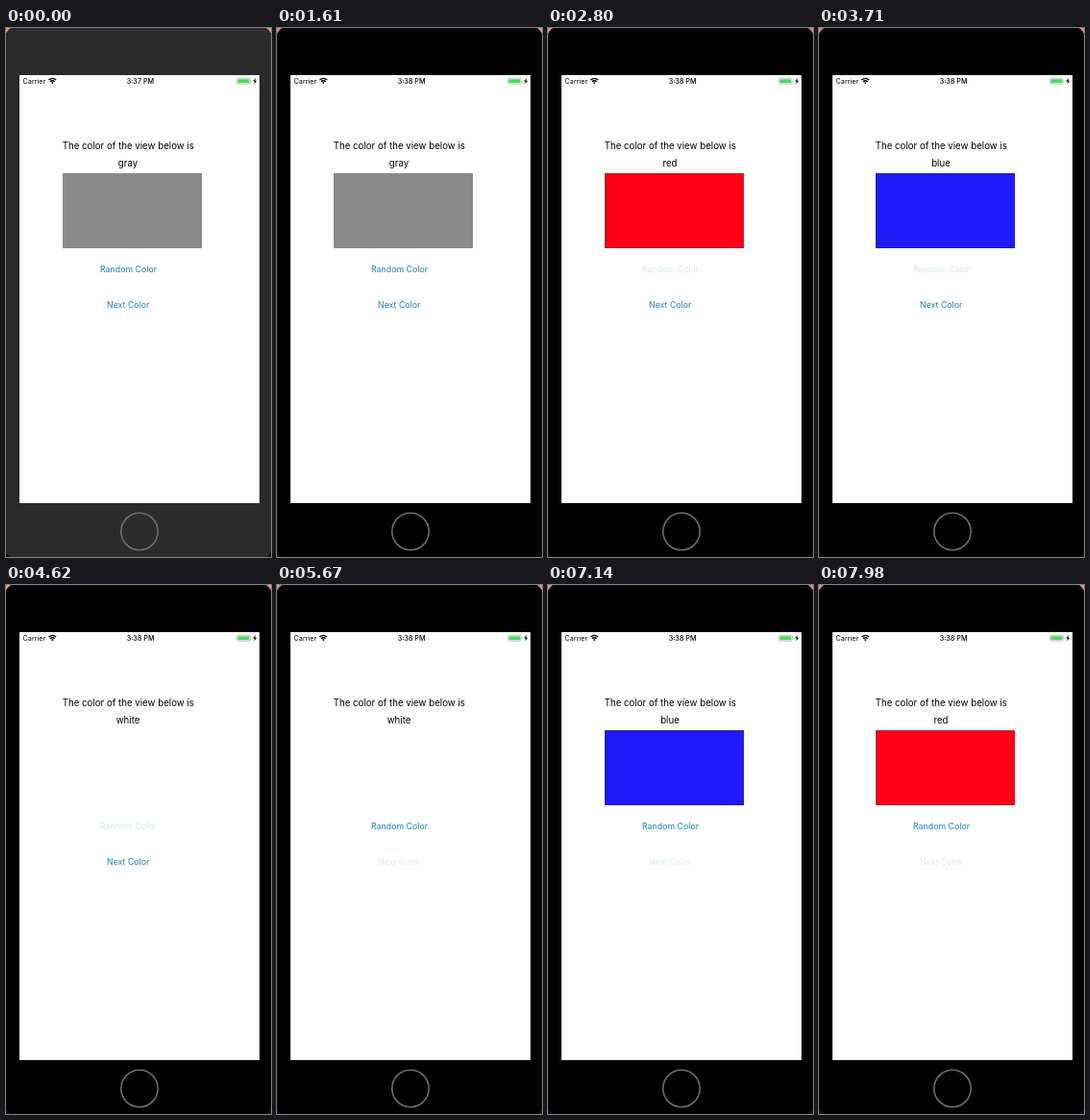
Animation of 276x550 px, one loop 8 s. Source, as an HTML page:

```html
<!DOCTYPE html>
<html lang="en">
<head>
<meta charset="utf-8">
<title>Color view</title>
<style>
  html, body { margin: 0; width: 100%; height: 100%; overflow: hidden; background: #000; }
  svg { display: block; width: 100%; height: 100%; }
  text { font-family: Inter, Roboto, sans-serif; }
  .status { font-size: 7.2px; }
  .label { font-size: 9.7px; text-anchor: middle; }
  .button { font-size: 8.8px; text-anchor: middle; fill: #1a84b0; }
  #bezel { fill: #2b2b2b; animation: focus 8s step-end infinite; }
  @keyframes focus { 20.125% { fill: #000; } }
</style>
</head>
<body>
<svg viewBox="0 0 276 550">
  <rect id="bezel" width="276" height="550"/>
  <g fill="#d99087" stroke="#1a1010" stroke-width="1">
    <path d="M-1-1H7Q2 2-1 8Z"/>
    <path d="M277-1H269Q274 2 277 8Z"/>
  </g>
  <path d="M0 545Q2 548 5 550H0ZM276 545Q274 548 271 550H276Z" fill="#1c0d0d"/>
  <circle cx="139" cy="523.5" r="19.2" fill="none" stroke="#6c6c6c" stroke-width="1.6"/>
  <rect x="14" y="49" width="250" height="445" fill="#fff"/>

  <text class="status" x="17.6" y="58">Carrier</text>
  <g fill="none" stroke="#000" stroke-width="1.3">
    <path d="M44.4 54.1Q48.3 50.6 52.2 54.1"/>
    <path d="M45.9 55.8Q48.3 53.7 50.7 55.8"/>
  </g>
  <path d="M48.3 58.2L46.9 56.8Q48.3 55.7 49.7 56.8Z"/>
  <text class="status" id="clock" x="125.7" y="58" font-weight="500"></text>
  <rect x="240.4" y="52.2" width="14" height="6" rx="1.4" fill="none" stroke="#a5b5aa" stroke-width=".7"/>
  <rect x="241.4" y="53.2" width="12" height="4" rx=".6" fill="#4cd964"/>
  <path d="M255.1 54.2q1 1 0 2Z" fill="#a5b5aa"/>
  <path d="M260 51.8L257.2 55.6H259L258.3 58.6L261.2 54.7H259.3Z"/>

  <text class="label" x="127.3" y="126">The color of the view below is</text>
  <text class="label" id="name" x="127" y="143.7"></text>
  <rect id="view" x="59" y="151" width="145" height="78"/>
  <rect id="edge" x="59.25" y="151.25" width="144.5" height="77.5" fill="none" stroke-width=".5"/>
  <text class="button" id="random" x="127.5" y="253.8">Random Color</text>
  <text class="button" id="next" x="127.2" y="290.6">Next Color</text>
</svg>
<script>
  const LOOP = 8000, FADE = 420, DIM = 0.16;
  const colors = {
    gray: '#8a8a8a', brown: '#a57144', red: '#ff0018',
    blue: '#1f1af7', green: '#21f906', white: '#fff'
  };
  const edges = { red: '#70304a', blue: '#20205a' };
  const shown = [
    [0, 'gray'], [1820, 'brown'], [2800, 'red'], [3710, 'blue'], [4620, 'white'],
    [6580, 'blue'], [7350, 'green'], [7980, 'red']
  ];
  // Each press is [touch down, release].
  const presses = {
    random: [[1680, 1820], [2660, 2800], [3570, 3710], [4480, 4620]],
    next: [[5670, 5880], [6510, 6580], [7070, 7350], [7770, 7980]]
  };
  const el = id => document.getElementById(id);

  function opacity(list, t) {
    const press = list.findLast(([down]) => t >= down);
    if (!press) return 1;
    const k = Math.min(1, Math.max(0, (t - press[1]) / FADE));
    return DIM + (1 - DIM) * k * k * (3 - 2 * k);
  }

  function draw(now) {
    const t = now % LOOP;
    const name = shown.findLast(([start]) => t >= start)[1];
    el('name').textContent = name;
    el('view').setAttribute('fill', colors[name]);
    el('edge').setAttribute('stroke', edges[name] || 'none');
    el('clock').textContent = t < 1190 ? '3:37 PM' : '3:38 PM';
    for (const id in presses) el(id).setAttribute('opacity', opacity(presses[id], t));
    requestAnimationFrame(() => draw(performance.now()));
  }
  draw(performance.now());
</script>
</body>
</html>
```
